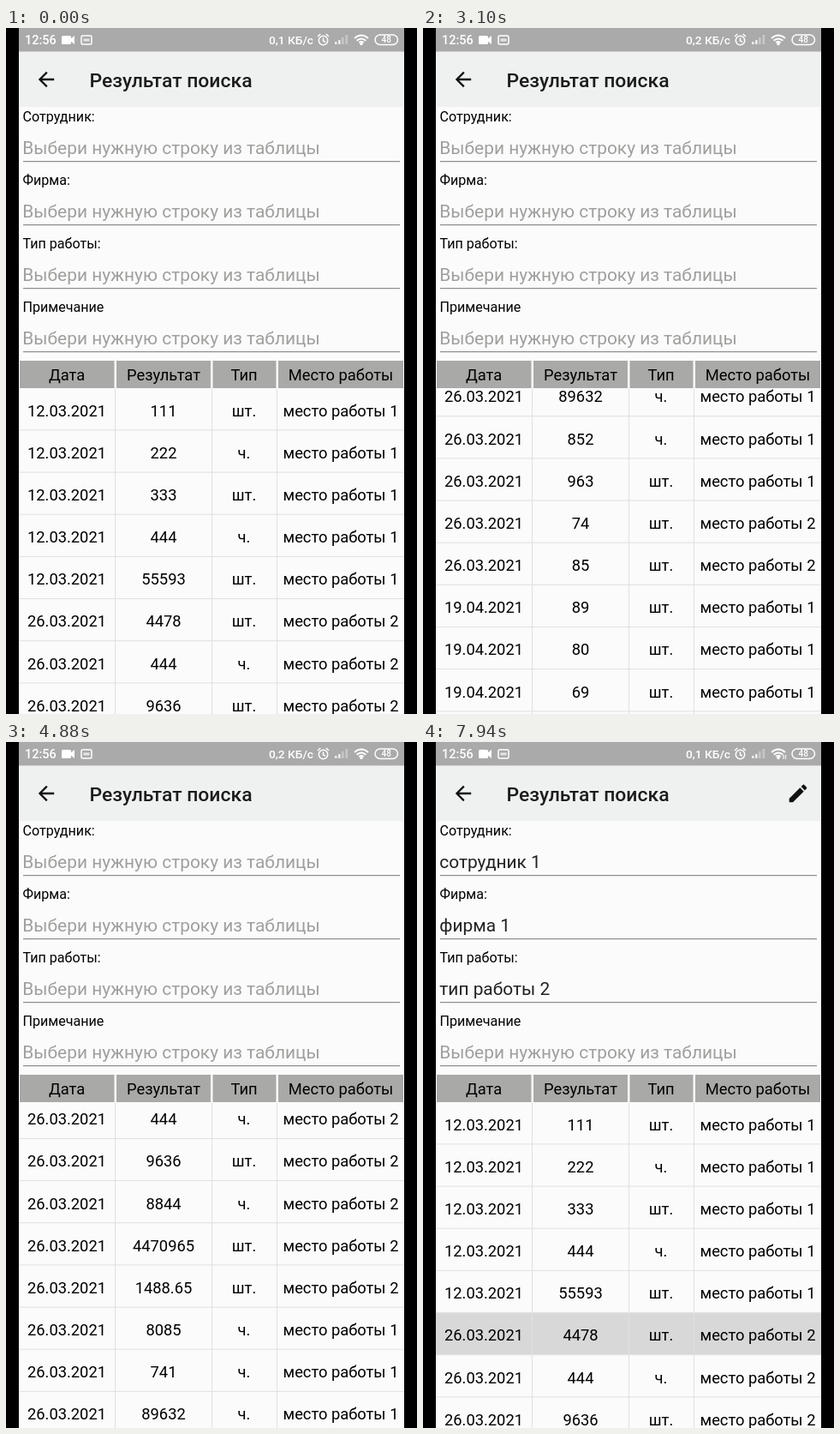
These frames come from a looping animation (480x800 px, 7.99 s). An HTML page:

```html
<!DOCTYPE html>
<html lang="ru">
<head>
<meta charset="utf-8">
<style>
  html, body { margin: 0; height: 100%; overflow: hidden; background: #000; }
  svg { font-family: Roboto, "Noto Sans", sans-serif; }
  #stage { display: block; width: 100vw; height: 100vh; }
  .mid { text-anchor: middle; }
  .cell { font-size: 18.33px; text-anchor: middle; }
  .label { font-size: 16.1px; }
  .field { font-size: 20.9px; }
</style>
</head>
<body>
<svg id="stage" viewBox="0 0 480 800"></svg>
<script>
const LOOP = 7990, HOLD = 460, STEP = 41.33, ROW = 49.15, TOP = 420.3;
const HINT = 'Выбери нужную строку из таблицы';
const COLS = [71, 184, 278, 391];
const DAYS = {
  '12.03': '111ш1 222ч1 333ш1 444ч1 55593ш1',
  '26.03': '4478ш2 444ч2 9636ш2 8844ч2 4470965ш2 1488.65ш2 8085ч1 741ч1 89632ч1 852ч1 963ш1 74ш2 85ш2',
  '19.04': '89ш1 80ш1 69ш1 58ш1 96ш1 25ч2 69ч2',
  '23.04': '58ч1 25ч1 66ш1 44ш2 58ш1',
  '03.05': '69ш1 69ш2 6636ч2 66ш2 58ш2 47ч2 85ш1'
};
// [time, list offset]
const SCROLL = [[2490, 0], [2570, 42.4], [3000, 560], [3300, 790], [3560, 879],
                [4060, 1263], [4240, 1310], [4880, 303.5], [5350, 0], [LOOP, 0]];
// row, ripple x, ripple y, press time, release time
const PRESSES = [[2, 354, 44, 2390, 2560], [3, 352, 28, 6300, 6400], [5, 350, 28, 7420, 7520]];
const PICKS = [[6400, 3, 1], [7520, 5, 2]];

const text = (x, y, s, cls, more = '') => `<text x="${x}" y="${y}" class="${cls}" ${more}>${s}</text>`;
const rect = (x, y, w, h, fill, more = '') =>
  `<rect x="${x}" y="${y}" width="${w}" height="${h}" fill="${fill}" ${more}/>`;
const clamp = v => Math.max(0, Math.min(1, v));

const rows = Object.entries(DAYS).flatMap(([day, list]) => list.split(' ').map(item => {
  const [, value, unit, place] = item.match(/^(.+)([шч])(\d)$/);
  return [day + '.2021', value, unit === 'ш' ? 'шт.' : 'ч.', 'место работы ' + place];
}));

const rowMarkup = (cells, i) =>
  cells.map((s, c) => text(COLS[c], i * ROW + 32.4, s, 'cell')).join('') +
  rect(15, (i + 1) * ROW - 1, 450, 1, '#dfe0df');

const statusIcons = `
  <g fill="#fff">
    <rect x="65" y="9" width="11" height="10" rx="1.5"/><path d="M75 13l5-4v10l-5-4z"/>
    <rect x="90.5" y="12.5" width="7" height="3" opacity=".7"/>
    <path d="M384 19v-3h2.6v3zM388 19v-5h2.6v5z" opacity=".75"/>
    <path d="M392 19v-8h2.6v8zM396.5 19V8h2.6v11z" opacity=".35"/>
    <circle cx="415" cy="18.5" r="1.8"/>
  </g>
  <g fill="none" stroke="#fff" stroke-width="1.5">
    <rect x="88" y="9" width="12" height="10" rx="1.5"/>
    <circle cx="370.5" cy="14.5" r="5.2"/><path d="M370.5 11.5v3.5l2.5 1.3M364 10l3.3-3M377 10l-3.3-3"/>
    <path d="M407 12q8-7 16 0M409.6 14.8q5.4-4.6 10.8 0M412.2 17q2.8-2.2 5.6 0" stroke-width="1.8"/>
    <rect x="431" y="8" width="26.5" height="11.5" rx="5.7"/>
  </g>
  <path id="traffic" d="M421 15v5M423.5 15v5" stroke="#fff" stroke-width="1.3"/>
  ${text(444.3, 17.4, '48', 'mid', 'font-size="10" font-weight="500" fill="#fff"')}`;

const headers = [['Дата', 16, 126.5], ['Результат', 129, 239], ['Тип', 241.5, 315.5], ['Место работы', 318, 464]];
const labels = ['Сотрудник:', 'Фирма:', 'Тип работы:', 'Примечание'];
const icon = (x, d, more = '') =>
  `<path ${more} transform="translate(${x} 60) scale(1.146) translate(-12 -12)" d="${d}" fill="#111"/>`;

document.getElementById('stage').innerHTML =
  rect(0, 0, 480, 800, '#000') + rect(15, 0, 450, 800, '#fafbfa') +
  rect(15, 27, 450, 65, '#eff1f0') + rect(15, 0, 450, 27.5, '#a9aaa9') +
  text(22, 19, '12:56', '', 'font-size="14.5" font-weight="500" fill="#fff"') +
  text(359, 19, '', '', 'id="speed" font-size="13.7" font-weight="500" fill="#fff" text-anchor="end"') +
  statusIcons +
  icon(47, 'M20 11H7.83l5.59-5.59L12 4l-8 8 8 8 1.41-1.41L7.83 13H20z') +
  icon(438, 'M3 17.25V21h3.75L17.81 9.94l-3.75-3.75zM20.71 7.04a1 1 0 0 0 0-1.41l-2.34-2.34a1 1 0 0 0-1.41 0l-1.83 1.83 3.75 3.75z', 'id="pencil"') +
  text(97.5, 69, 'Результат поиска', '', 'font-size="22.9" font-weight="500" fill="#1c1c1c"') +
  labels.map((s, i) => text(19.5, 109 + i * 73.9, s, 'label') +
    text(19.3, 147.3 + i * 73.9, '', 'field', `id="field${i}"`) +
    rect(20, Math.round(155 + i * 73.9), 440, 1.2, '#8c8c8a')).join('') +
  `<svg x="0" y="${TOP}" width="480" height="380"><g id="list">
    ${rect(15, 0, 450, ROW - 1, '#000', 'id="chosen" fill-opacity=".14"')}
    <svg id="press" width="465" height="${ROW - 1}">
      ${rect(15, 0, 450, ROW, '#ecedec')}<circle id="ripple" fill="#000" fill-opacity=".06"/>
    </svg>
    ${rows.map(rowMarkup).join('')}</g>
    ${[127, 240, 316].map(x => rect(x, 0, 1, 380, '#dfe0df')).join('')}</svg>` +
  headers.map(([s, a, b], i) => rect(a, 388, b - a, 32, '#a9aaa8') + text(COLS[i], 411.4, s, 'cell')).join('');

const el = Object.fromEntries([...document.querySelectorAll('[id]')].map(e => [e.id, e]));

// Monotone cubic through the scroll points
function scrollAt(t) {
  const i = SCROLL.findIndex(p => p[0] > t);
  if (i < 1) return 0;
  const secant = k => SCROLL[k] && SCROLL[k + 1]
    ? (SCROLL[k + 1][1] - SCROLL[k][1]) / (SCROLL[k + 1][0] - SCROLL[k][0]) : 0;
  const slope = k => {
    const a = secant(k - 1), b = secant(k);
    return a * b > 0 ? 2 * a * b / (a + b) : 0;
  };
  const [t0, y0] = SCROLL[i - 1], [t1, y1] = SCROLL[i], h = t1 - t0, u = (t - t0) / h;
  return y0 + (y1 - y0) * u * u * (3 - 2 * u) +
    h * u * (1 - u) * ((1 - u) * slope(i - 1) - u * slope(i));
}

function draw(t) {
  el.list.setAttribute('transform', `translate(0 ${-scrollAt(t)})`);
  el.speed.textContent = (t > 1500 && t < 5600 ? '0,2' : '0,1') + ' КБ/с';
  el.traffic.style.opacity = (t > 2000 && t < 3000) || t > 6300 ? 0.8 : 0;

  const pick = PICKS.filter(p => t >= p[0]).pop();
  el.pencil.style.display = el.chosen.style.display = pick ? '' : 'none';
  if (pick) el.chosen.setAttribute('y', pick[1] * ROW);
  const values = pick ? ['сотрудник 1', 'фирма 1', 'тип работы ' + pick[2]] : [];
  labels.forEach((_, i) => {
    const field = el['field' + i];
    field.textContent = values[i] || HINT;
    field.setAttribute('fill', values[i] ? '#222' : '#9fa09e');
  });

  const press = PRESSES.find(p => t >= p[3] && t < p[4] + 250);
  el.press.style.display = press ? '' : 'none';
  if (press) {
    const [row, x, y, down, up] = press;
    el.press.setAttribute('y', row * ROW);
    el.press.style.opacity = Math.min(clamp((t - down) / 60), clamp(1 - (t - up) / 250));
    el.ripple.setAttribute('cx', x);
    el.ripple.setAttribute('cy', y);
    el.ripple.setAttribute('r', 10 + (t - down) * 0.19);
  }
}

function tick() {
  const t = performance.now() % LOOP;
  draw(t < HOLD ? 0 : HOLD + Math.floor((t - HOLD + 5) / STEP) * STEP);
  requestAnimationFrame(tick);
}
tick();
</script>
</body>
</html>
```
